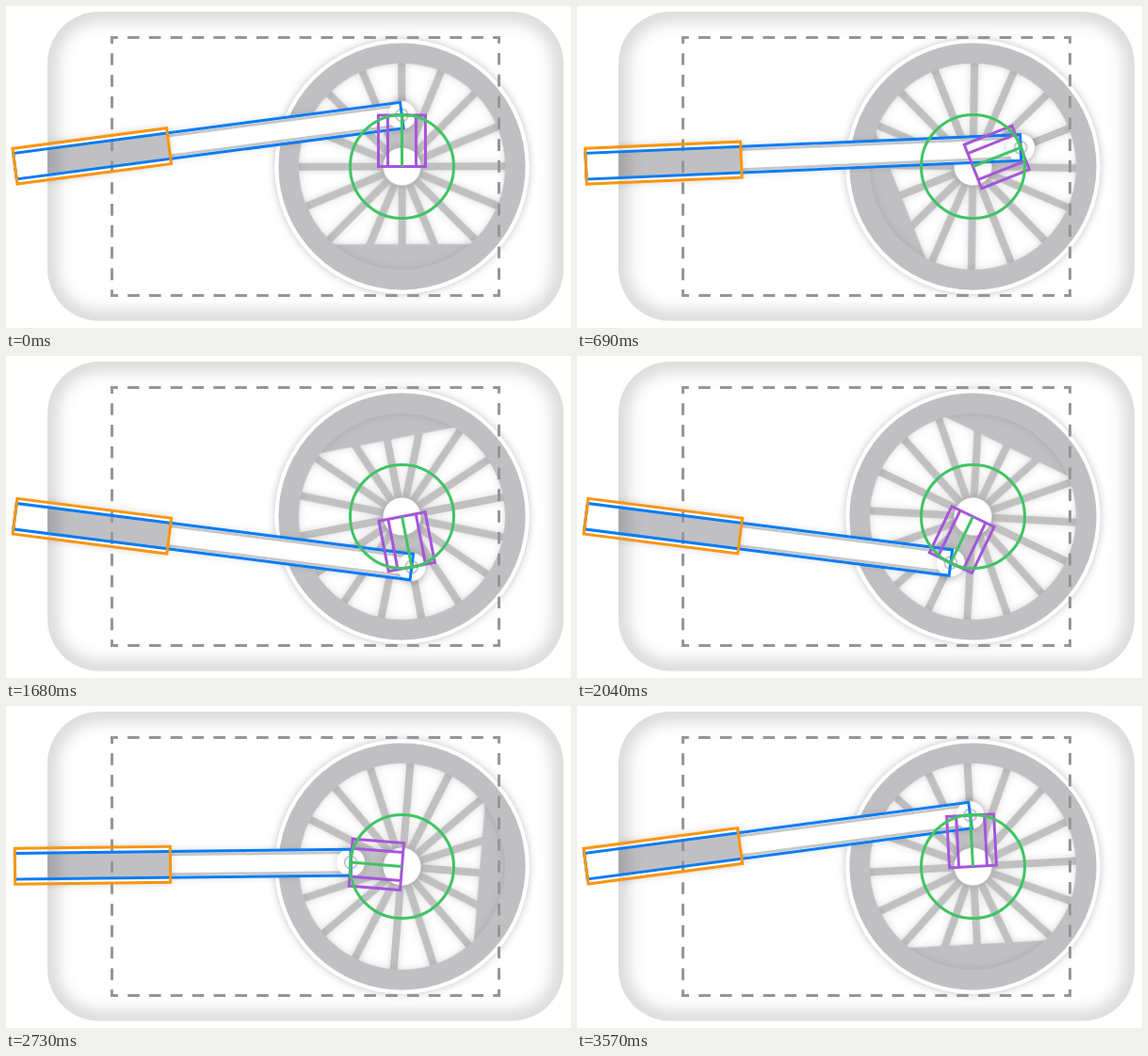
These frames come from a looping animation (600x342 px, 3.6 s). An HTML page:

```html
<!DOCTYPE html>
<html lang="en">
<head>
<meta charset="utf-8">
<title>Wheel and piston</title>
<style>
  html, body { margin: 0; width: 100%; height: 100%; overflow: hidden; background: #fff; }
  svg { display: block; width: 600px; height: 342px; }
  .outline { fill: none; stroke-width: 3; }
  .metal { fill: #c0c0c3; }
  .white { fill: #fff; }
  .raised { filter: drop-shadow(0 0 5px #0003); }
  .inner { filter: drop-shadow(0 0 4px #0002); }
  .spokes { stroke: #c0c0c3; stroke-width: 8; }
  .rim { fill: none; stroke: #c0c0c3; stroke-width: 22; }
  .edge { fill: none; stroke: #fff; stroke-width: 4; }
  .vignette { fill: none; stroke: #0000002e; stroke-width: 18; filter: blur(9px); }
</style>
</head>
<body>
<svg viewBox="0 0 600 342">
  <clipPath id="card"><rect x="44" y="6" width="548" height="328.5" rx="55"/></clipPath>

  <g clip-path="url(#card)">
    <g transform="translate(420.5 170.5)">
      <circle class="white raised" r="135"/>
      <g class="crank">
        <g class="inner">
          <path id="spokes" class="spokes"/>
          <path class="metal" d="M-75 82.5H75V90A117 117 0 0 1-75 90Z"/>
        </g>
        <circle class="rim inner" r="120.5"/>
        <circle class="edge" r="133.2"/>
        <path class="metal raised" d="M-15 0V-54.5A15 15 0 0 1 15-54.5V0Z"/>
        <circle class="white raised" r="20"/>
      </g>
    </g>

    <g class="rod">
      <rect class="white raised span" y="-13" height="26"/>
      <rect class="span" y="-10.5" height="21" fill="#fff" stroke="#c6c6c8" stroke-width="3"/>
      <rect class="white raised" width="165" y="-19" height="38"/>
      <rect class="metal" width="165" y="-14.5" height="29"/>
    </g>
    <g class="crank" transform="translate(420.5 170.5)">
      <circle class="white raised" cy="-54.5" r="15"/>
      <circle cy="-54.5" r="6.5" fill="none" stroke="#c8c8ca" stroke-width="2"/>
    </g>
    <rect class="vignette" x="44" y="6" width="548" height="328.5" rx="55"/>
  </g>

  <rect class="outline" x="112.5" y="33.5" width="411" height="274" stroke="#969698"
        stroke-dasharray="12.6 10.23" stroke-dashoffset="6.3"/>

  <g class="rod outline">
    <rect class="span" y="-13.8" height="27.6" stroke="#087cf5"/>
    <rect width="165" y="-19" height="38" stroke="#fa960f"/>
  </g>
  <g class="crank outline">
    <path d="M-25 0V-54.5H25V0ZM-15 0V-54.5M15 0V-54.5" stroke="#a655da"/>
    <path d="M0 0V-54.5" stroke="#40c463"/>
  </g>
  <circle class="outline" cx="420.5" cy="170.5" r="55" stroke="#40c463"/>
</svg>
<script>
  const hub = { x: 420.5, y: 170.5 }, pivot = { x: 9.5, y: 170.2 }, throwRadius = 54.5;
  const period = 3600, step = 30, rad = Math.PI / 180;
  const all = selector => document.querySelectorAll(selector);
  const cranks = all('.crank'), rods = all('.rod'), spans = all('.span');

  let spokes = '';
  for (let i = 0; i < 16; i++) {
    const a = i * Math.PI / 8;
    spokes += `M0 0L${111 * Math.sin(a)} ${-111 * Math.cos(a)}`;
  }
  document.getElementById('spokes').setAttribute('d', spokes);

  function draw() {
    const time = Math.floor(performance.now() / step) * step % period;
    const even = 360 * time / period;
    // The wheel runs slightly unevenly within each turn.
    const turn = even + 0.6 - 1.3 * Math.cos((even - 55) * rad);
    const dx = hub.x + throwRadius * Math.sin(turn * rad) - pivot.x;
    const dy = hub.y - throwRadius * Math.cos(turn * rad) - pivot.y;
    const tilt = Math.atan2(dy, dx) / rad;

    cranks.forEach(el => {
      const nested = el.parentNode.hasAttribute('transform');
      const place = nested ? '' : `translate(${hub.x} ${hub.y}) `;
      el.setAttribute('transform', `${place}rotate(${turn})`);
    });
    rods.forEach(el => el.setAttribute('transform', `translate(${pivot.x} ${pivot.y}) rotate(${tilt})`));
    spans.forEach(el => el.setAttribute('width', Math.hypot(dx, dy)));
    requestAnimationFrame(draw);
  }
  draw();
</script>
</body>
</html>
```
